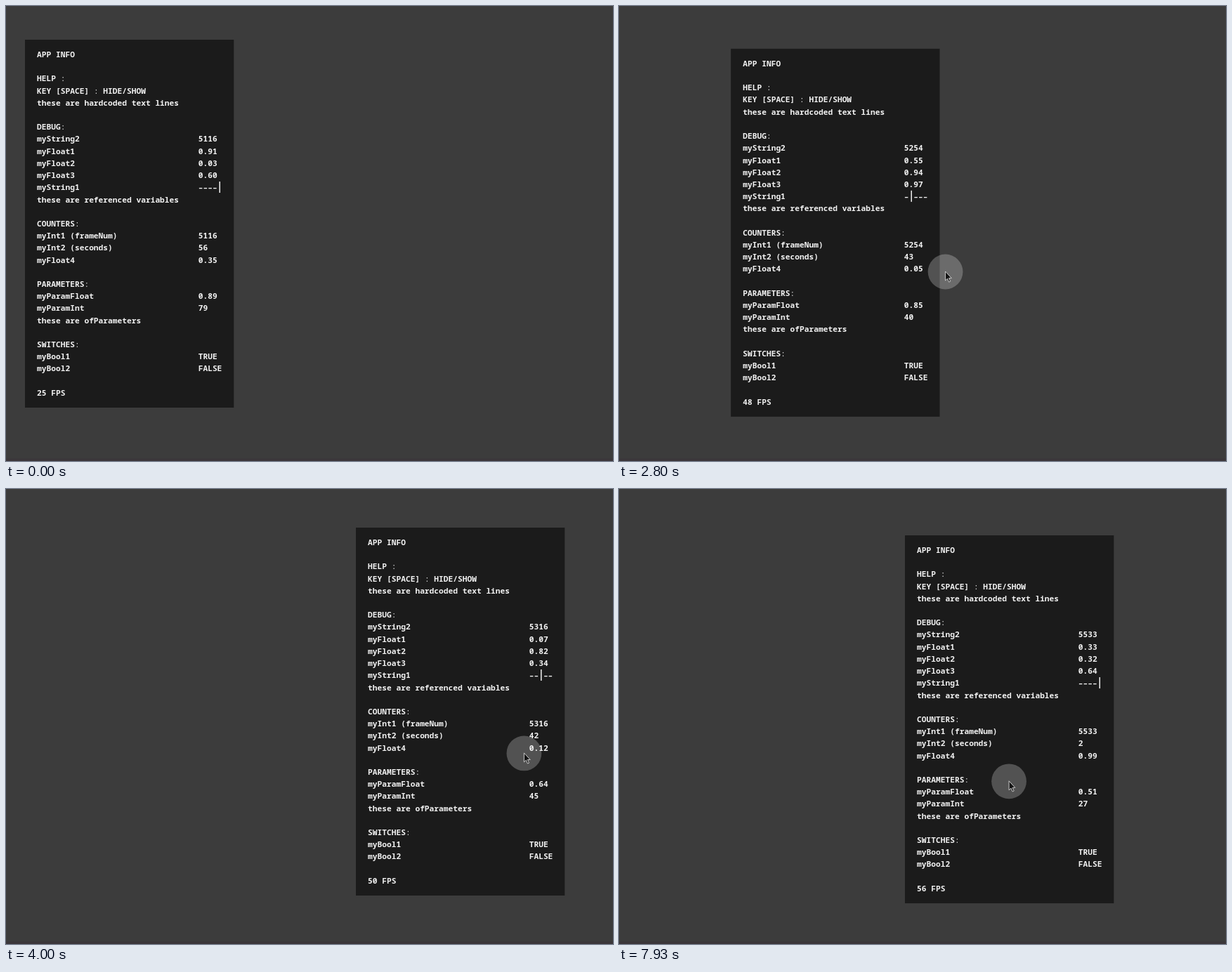
These frames come from a looping animation (864 by 648 pixels, 8000 ms). An HTML page:

```html
<!DOCTYPE html>
<html lang="en">
<head>
<meta charset="utf-8">
<title>App info panel</title>
<style>
  html, body { margin: 0; width: 100%; height: 100%; overflow: hidden; background: #3c3c3c; }
  svg { display: block; width: 100vw; height: 100vh; }
  text {
    font: 600 11.22px "Noto Sans Mono", "DejaVu Sans Mono", monospace;
    fill: #f2f2f2;
    white-space: pre;
    font-variant-ligatures: none;
  }
  .colon { font-weight: 400; }
</style>
</head>
<body>
<svg viewBox="0 0 864 648">
  <rect width="864" height="648" fill="#3c3c3c"/>
  <rect y="644.5" width="864" height="3.5" fill="#3b363a"/>
  <g id="panel">
    <rect width="297.3" height="524" fill="#1b1b1b"/>
    <g id="lines"></g>
    <rect id="bar" width="1.5" height="16" fill="#f2f2f2"/>
  </g>
  <g id="pointer">
    <circle r="24.9" fill="#fff" fill-opacity=".245"/>
    <path d="M0 -.5V12.5L2.9 9.8L5 14.6L7.1 13.7L5 9.1H8.8Z" fill="#141414" stroke="#d8d8d8" stroke-width=".9" stroke-linejoin="round"/>
  </g>
</svg>
<script>
const LOOP = 8000, STEPS = 120, POINTER_SHOWN = 33;
const LINE = 17.21, FIRST = 25, LABEL_X = 17.1, VALUE_X = 246.7, CELL = 6.73;

const $ = id => document.getElementById(id);
const fixed = v => v.toFixed(2);

function random(step, seed) {
  const n = Math.sin(step * 127.1 + seed * 311.7 + 5) * 43758.5453;
  return n - Math.floor(n);
}
const unit = seed => step => fixed(random(step, seed));
const whole = (seed, count) => step => Math.floor(random(step, seed) * count);

const frameNum = step => Math.round(5116 + 3.15 * step + .003 * step * step);
const fps = step => Math.round(25 + 31 * (step / STEPS) ** .3);
const barCell = whole(4, 5);
const dashes = step => '–'.repeat(barCell(step)) + '\u00a0' + '–'.repeat(4 - barCell(step));

// Each line is a label with an optional value rule; a function alone makes the whole line.
const LINES = [
  ['APP INFO'], [],
  ['HELP :'], ['KEY [SPACE] : HIDE/SHOW'], ['these are hardcoded text lines'], [],
  ['DEBUG:'],
  ['myString2', frameNum],
  ['myFloat1', unit(1)],
  ['myFloat2', unit(2)],
  ['myFloat3', unit(3)],
  ['myString1', dashes],
  ['these are referenced variables'], [],
  ['COUNTERS:'],
  ['myInt1 (frameNum)', frameNum],
  ['myInt2 (seconds)', whole(5, 60)],
  ['myFloat4', unit(6)], [],
  ['PARAMETERS:'],
  ['myParamFloat', unit(7)],
  ['myParamInt', whole(8, 131)],
  ['these are ofParameters'], [],
  ['SWITCHES:'],
  ['myBool1', step => random(step, 9) < .5 ? 'FALSE' : 'TRUE'],
  ['myBool2', () => 'FALSE'], [],
  [step => fps(step) + ' FPS']
];
const BAR_ROW = LINES.findIndex(line => line[1] === dashes);

function addText(x, row) {
  const el = document.createElementNS('http://www.w3.org/2000/svg', 'text');
  el.setAttribute('x', x);
  el.setAttribute('y', FIRST + row * LINE);
  $('lines').append(el);
  return el;
}

const live = [];
LINES.forEach((line, row) => line.forEach((content, column) => {
  const el = addText(column ? VALUE_X : LABEL_X, row);
  if (typeof content === 'function') live.push([el, content]);
  else el.innerHTML = content.replace(':', '<tspan class="colon">:</tspan>');
}));

function progress(step, from, to) {
  return Math.min(1, Math.max(0, (step - from) / (to - from)));
}
function ease(step, from, to) {
  const p = progress(step, from, to);
  return p * p * (3 - 2 * p);
}

// A long drag right with a dip, a small nudge, then a drag back left.
function panelAt(step) {
  const p = progress(step, 38.45, 48.45);
  const right = ease(step, 38.45, 48.45);
  const nudge = ease(step, 53.5, 58);
  const left = ease(step, 116.9, 120.4);
  return [
    27 + 458 * right + 13 * nudge - 140.4 * left,
    48 - 4 * right + 147 * p * (1 - p) ** 3 + 11 * nudge + 17 * left
  ];
}

// The pointer leads the panel by one step and later takes a new grip.
function pointerAt(step) {
  const [x, y] = panelAt(step + 1);
  const regrip = ease(step, 84, 94);
  return [x + 239.4 - 47 * regrip, y + 321.4 + 23.5 * regrip];
}

function place(id, [x, y]) {
  $(id).setAttribute('transform', `translate(${x} ${y})`);
}

function draw(step) {
  for (const [el, rule] of live) el.textContent = rule(step);
  place('bar', [VALUE_X + (barCell(step) + .5) * CELL - .5, FIRST + BAR_ROW * LINE - 12.3]);
  place('panel', panelAt(step));
  place('pointer', pointerAt(step));
  $('pointer').style.display = step < POINTER_SHOWN ? 'none' : '';
}

const start = performance.now();
let shown = -1;
function tick() {
  const t = (performance.now() - start) % LOOP;
  const step = Math.min(STEPS - 1, Math.floor((t + 5) * STEPS / LOOP));
  if (step !== shown) draw(shown = step);
  requestAnimationFrame(tick);
}
tick();
</script>
</body>
</html>
```
